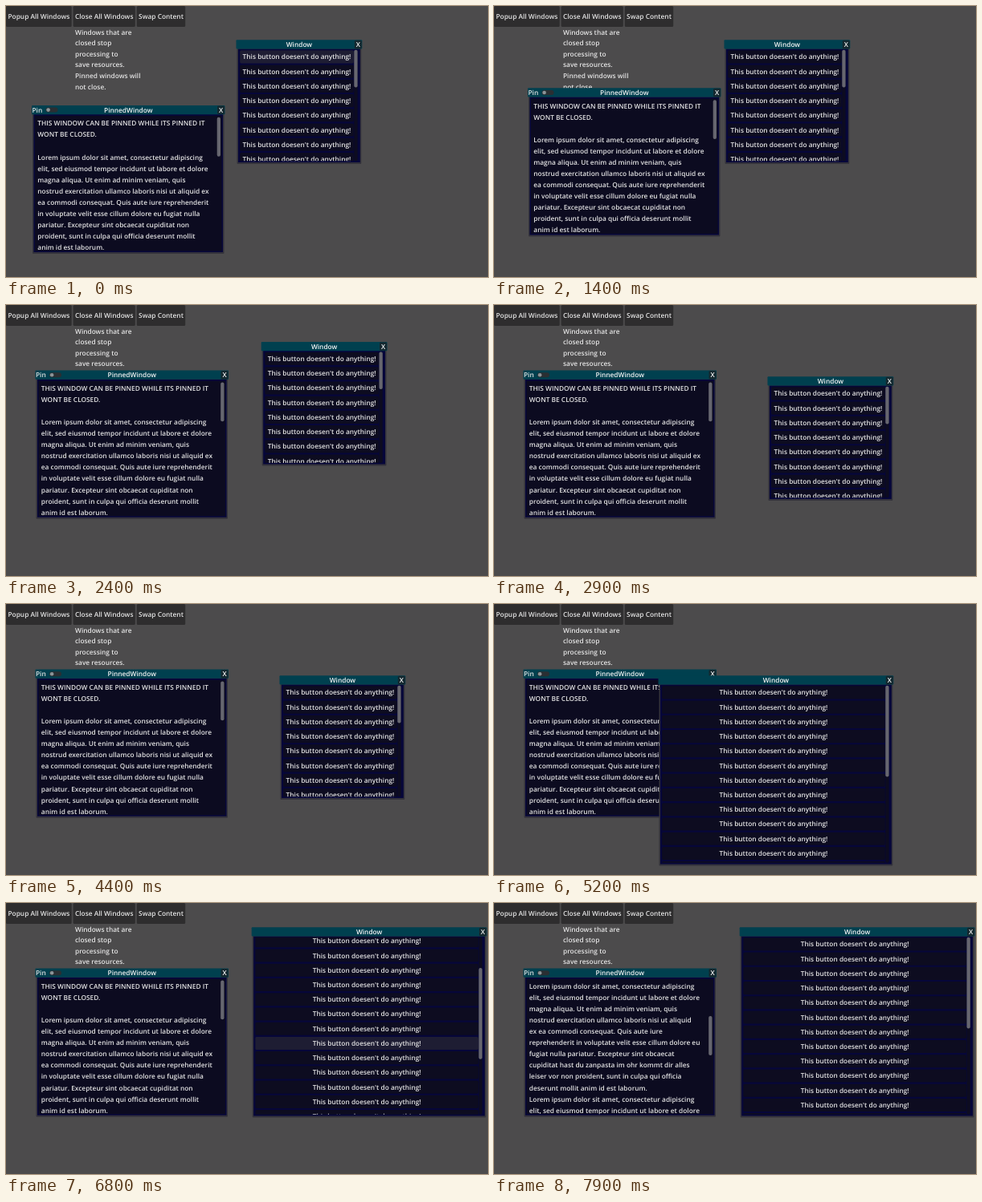
An HTML page with a canvas that plays this animation: 600 by 338 pixels, repeating every 8000 ms.

```html
<!DOCTYPE html>
<html lang="en">
<head>
<meta charset="utf-8">
<title>Windows</title>
<style>
  html, body { margin: 0; height: 100%; overflow: hidden; background: #4c4b4c; }
  canvas { display: block; }
</style>
</head>
<body>
<canvas id="stage" width="600" height="338"></canvas>
<script>
const ctx = document.getElementById('stage').getContext('2d');
const LOOP = 8000, TICK = 100;
const LINE = 14.06, PITCH = 18.23, ROW_HEIGHT = 16.1, ROWS = 24;
const MIN_THUMB = 4.2;
const MOUSE_Y = 175;

const LABEL = ['Windows that are', 'closed stop', 'processing to',
  'save resources.', 'Pinned windows will', 'not close.'];

const OPENING = ['Lorem ipsum dolor sit amet, consectetur adipiscing',
  'elit, sed eiusmod tempor incidunt ut labore et dolore',
  'magna aliqua. Ut enim ad minim veniam, quis'];
const TEXT = [
  'THIS WINDOW CAN BE PINNED WHILE ITS PINNED IT', 'WONT BE CLOSED.', '',
  ...OPENING,
  'nostrud exercitation ullamco laboris nisi ut aliquid ex',
  'ea commodi consequat. Quis aute iure reprehenderit',
  'in voluptate velit esse cillum dolore eu fugiat nulla',
  'pariatur. Excepteur sint obcaecat cupiditat non',
  'proident, sunt in culpa qui officia deserunt mollit',
  'anim id est laborum.',
  ...OPENING,
  'nostrud exercitation ullamco laboris nisi ut aliquid',
  'ex ea commodi consequat. Quis aute iure',
  'reprehenderit in voluptate velit esse cillum dolore eu',
  'fugiat nulla pariatur. Excepteur sint obcaecat',
  'cupiditat hast du zanpasta im ohr kommt dir alles',
  'leiser vor non proident, sunt in culpa qui officia',
  'deserunt mollit anim id est laborum.',
  ...OPENING];

// Mouse-driven tracks: a resting value, then one value per tick from each start time.
const PINNED_POS = [[0, [32, 129.6]],
  [1400, [42, 108], [55, 76], [59.5, 50.6], [36, 57], [14, 76], [36.5, 87.2]]];
const WINDOW_POS = [[0, [286.5, 48]],
  [2400, [317.7, 51.6], [344, 61], [370, 76], [364, 91], [350, 98], [340.5, 95]],
  [5700, [222, 82], [256, 56], [288, 33], [303, 22], [307, 30], [305.7, 36]]];
const WINDOW_SCROLL = [[0, 0], [6400, 27, 77, 132, 132, 77, 27, 0]];
const PINNED_SCROLL = [[0, 0], [7400, LINE * 2, LINE * 2, LINE * 4.5, LINE * 7, LINE * 9.5, LINE * 12]];
const HOVER_ROW = [[0, 0, 0, 2, 5, -1]];

function sample(track, t) {
  const [start, ...values] = track.filter(([from]) => t >= from).pop();
  return values[Math.min(values.length - 1, (t - start) / TICK)];
}

function box(x, y, w, h, color, radius = 0) {
  ctx.fillStyle = color;
  ctx.beginPath();
  ctx.roundRect(x, y, w, h, radius);
  ctx.fill();
}

function text(str, x, y, align = 'left', color = '#e4e4e4') {
  ctx.fillStyle = color;
  ctx.textAlign = align;
  ctx.fillText(str, x, y + 3);
}

function frame(x, y, w, h, title) {
  box(x + 1, y + 5, w - 2, h - 5, '#33323b', 1);
  box(x + 2.5, y + 5.5, w - 5, h - 7.5, '#06063a');
  box(x, y - 5.7, w, 11.3, '#00404f', 1);
  box(x + w - 9.5, y - 5.2, 9, 10.4, '#14282f', 1.5);
  text(title, x + w / 2, y, 'center', '#f4f4f4');
  text('X', x + w - 5, y, 'center', '#f4f4f4');
}

function thumb(x, top, view, content, scroll) {
  const scale = (view - MIN_THUMB) / content;
  box(x, top + scroll * scale, 4.3, MIN_THUMB + view * scale, '#66666f', 2);
}

function clipped(x, y, w, h, draw) {
  ctx.save();
  ctx.beginPath();
  ctx.rect(x, y, w, h);
  ctx.clip();
  draw();
  ctx.restore();
}

function toolbar() {
  [['Popup All Windows', 0, 81.7], ['Close All Windows', 83.6, 77.2], ['Swap Content', 162.8, 60.4]]
    .forEach(([label, x, w]) => {
      box(x, 0, w, 26, '#2e2d2e', 1.6);
      text(label, x + w / 2, 13, 'center');
    });
  LABEL.forEach((line, i) => text(line, 86, 32.8 + i * 13.54));
}

function pinnedWindow(t) {
  const [x, y] = sample(PINNED_POS, t), scroll = sample(PINNED_SCROLL, t);
  const w = 240.5, h = 179.5, top = y + 7.5, view = h - 11;
  frame(x, y, w, h, 'PinnedWindow');
  text('Pin', x + 0.5, y);
  box(x + 17.5, y - 3, 15, 6, '#2a2f33', 3);
  ctx.fillStyle = '#8b9498';
  ctx.beginPath();
  ctx.arc(x + 20.6, y, 2.3, 0, 7);
  ctx.fill();
  box(x + 4, top, w - 8, view, '#0c0b20');
  clipped(x + 4, top, w - 8, view, () =>
    TEXT.forEach((line, i) => text(line, x + 7.3, y + 16.8 + i * LINE - scroll)));
  thumb(x + w - 9.8, top + 1.7, view, 620, scroll);
}

function buttonWindow(t) {
  let [x, y] = sample(WINDOW_POS, t), w = 156.8, h = 149;
  const k = Math.min(1, Math.max(0, (t - 4400) / 800)), grow = k * k * (3 - 2 * k);
  if (t < 5700) x -= 136 * grow;
  w += 136 * grow;
  h += 82.5 * grow;

  const scroll = sample(WINDOW_SCROLL, t), top = y + 6.8, view = h - 10.5;
  const rowX = x + 4.7, rowW = w - 15.2;
  const mouseInside = t >= 6400 && t < 7200;
  frame(x, y, w, h, 'Window');
  clipped(x + 3, top, w - 6, view, () => {
    for (let i = 0; i < ROWS; i++) {
      const mid = y + 15.4 + i * PITCH - scroll;
      const hover = mouseInside ? Math.abs(mid - MOUSE_Y) < PITCH / 2 : i === sample(HOVER_ROW, t);
      box(rowX, mid - ROW_HEIGHT / 2, rowW, ROW_HEIGHT, hover ? '#1e1d33' : '#0d0c20', 1.6);
      text("This button doesen't do anything!", rowX + rowW / 2, mid, 'center');
    }
  });
  box(x + w - 10, top, 4.3, view, '#0d0c20', 2);
  thumb(x + w - 10, top, view, ROWS * PITCH, scroll);
}

function render(now) {
  const t = Math.floor(now % LOOP / TICK) * TICK;
  ctx.font = '600 8.333px "Open Sans", "Noto Sans", sans-serif';
  ctx.textRendering = 'geometricPrecision';
  box(0, 0, 600, 338, '#4c4b4c');
  toolbar();
  pinnedWindow(t);
  buttonWindow(t);
  requestAnimationFrame(render);
}
requestAnimationFrame(render);
</script>
</body>
</html>
```
